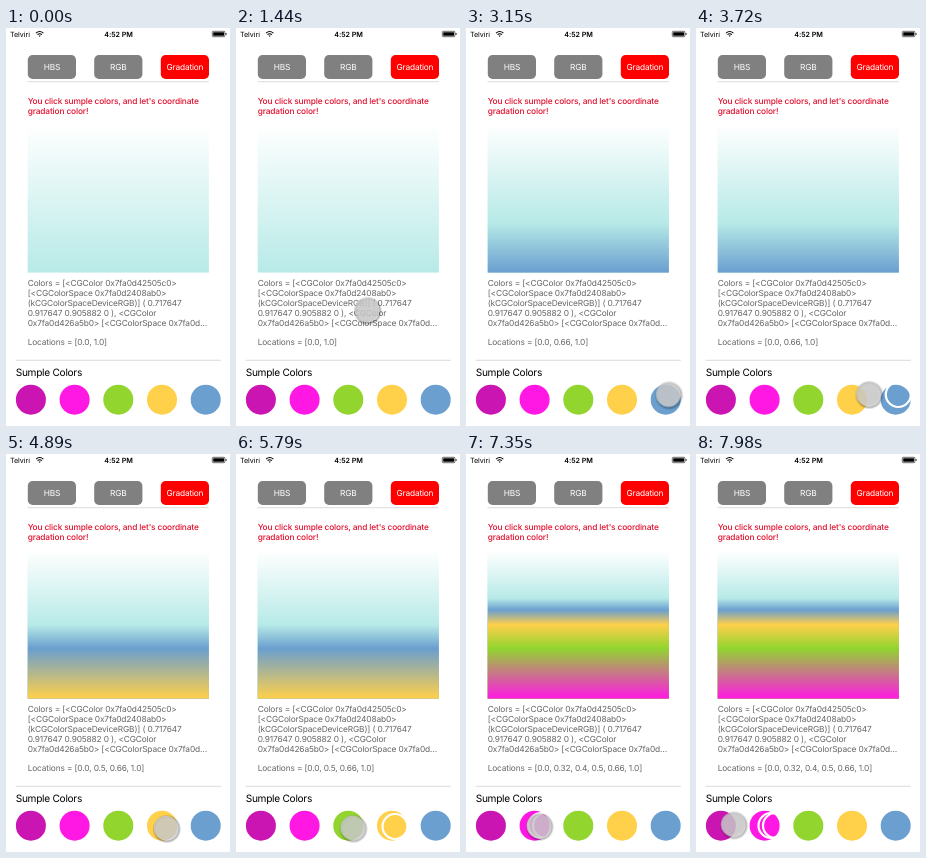
An HTML page for the animation above (8000 ms loop, 224x398 px).

```html
<!DOCTYPE html>
<html lang="en">
<head>
<meta charset="utf-8">
<title>Gradation</title>
<style>
  html, body { margin: 0; width: 100%; height: 100%; overflow: hidden; background: #fff; }
  svg { display: block; width: 100vw; height: 100vh; }
  text { font: 8.36px Inter, Roboto, sans-serif; letter-spacing: -.15px; white-space: pre; text-rendering: geometricPrecision; }
  .status { font-size: 7.17px; letter-spacing: -.06px; }
  .clock { font-weight: 600; text-anchor: middle; }
  .button { fill: #fff; text-anchor: middle; letter-spacing: -.2px; }
  .hint { fill: #e2102f; font-weight: 500; }
  .info { fill: #666; }
  .heading { font-size: 10.15px; letter-spacing: -.28px; }
  .rule { stroke: #ccc; stroke-width: .7; }

  /* Each tapped colour adds a stage that covers the one before. */
  .stage, .ring, #cursor { animation: 8s linear infinite; }
  .stage { opacity: 0; animation-timing-function: step-end; }
  .s1 { animation-name: tap1; }
  .s2 { animation-name: tap2; }
  .s3 { animation-name: tap3; }
  .s4 { animation-name: tap4; }
  @keyframes tap1 { 0% { opacity: 0 } 37.125%, 100% { opacity: 1 } }
  @keyframes tap2 { 0% { opacity: 0 } 61.125%, 100% { opacity: 1 } }
  @keyframes tap3 { 0% { opacity: 0 } 76.875%, 100% { opacity: 1 } }
  @keyframes tap4 { 0% { opacity: 0 } 88.875%, 100% { opacity: 1 } }

  /* White rings linger where the pointer rested. */
  .ring { fill: none; stroke: #fff; stroke-width: 2.2; opacity: 0; }
  .r0 { animation-name: rest0; stroke-width: 3; }
  .r1 { animation-name: rest1; }
  .r2 { animation-name: rest2; }
  .r3 { animation-name: rest3; }
  .r4 { animation-name: rest4; }
  @keyframes rest0 { 0%, 23.25% { opacity: 0 } 23.3%, 31.5% { opacity: 1 } 34.5%, 100% { opacity: 0 } }
  @keyframes rest1 { 0%, 40.5% { opacity: 0 } 40.6%, 47.25% { opacity: 1 } 51.375% { opacity: .3 } 58.125%, 100% { opacity: 0 } }
  @keyframes rest2 { 0%, 64.3% { opacity: 0 } 64.4%, 72.4% { opacity: 1 } 74.625%, 100% { opacity: 0 } }
  @keyframes rest3 { 0%, 79% { opacity: 0 } 79.1%, 81% { opacity: 1 } 83.75%, 100% { opacity: 0 } }
  @keyframes rest4 { 0%, 91.2% { opacity: 0 } 91.3%, 100% { opacity: 1 } }

  #cursor { animation-name: roam; }
  @keyframes roam {
    0% { opacity: 0; transform: translate(240px, 332px); animation-timing-function: step-end }
    9.375% { opacity: 1; transform: translate(217px, 326px); animation-timing-function: ease-out }
    10.5%, 12.75% { transform: translate(168px, 309px); animation-timing-function: ease-in-out }
    18% { transform: translate(131px, 282px) }
    18.75%, 21.75% { transform: translate(132px, 277.5px); animation-timing-function: ease-in-out }
    23.25% { transform: translate(127px, 271.5px); animation-timing-function: ease-in-out }
    31.125%, 40.125% { transform: translate(202.3px, 366.5px); animation-timing-function: ease-in-out }
    46.125%, 47.25% { transform: translate(172.5px, 366px) }
    51.375%, 55.875% { transform: translate(172.5px, 372.5px); animation-timing-function: ease-in-out }
    58.125%, 63.75% { transform: translate(160px, 374px); animation-timing-function: ease-in-out }
    71.25%, 78.375% { transform: translate(116.6px, 373.8px); animation-timing-function: ease-in-out }
    84.375% { transform: translate(79.5px, 372.5px) }
    86.625%, 90.75% { transform: translate(75px, 372px); animation-timing-function: ease-in-out }
    97.5%, 100% { opacity: 1; transform: translate(37.2px, 370.5px) }
  }
</style>
</head>
<body>
<svg viewBox="0 0 224 398" preserveAspectRatio="none">
  <defs>
    <radialGradient id="shade">
      <stop offset=".72" stop-color="#000" stop-opacity="0"/>
      <stop offset=".84" stop-color="#000" stop-opacity=".32"/>
      <stop offset="1" stop-color="#000" stop-opacity="0"/>
    </radialGradient>
  </defs>
  <rect width="224" height="398" fill="#fff"/>

  <text class="status" x="4" y="8.7">Telviri</text>
  <g fill="none" stroke="#000" stroke-width="1.1">
    <path d="M30 5.1Q33.7 1.9 37.4 5.1M31.5 6.7Q33.7 4.8 35.9 6.7"/>
    <path d="M32.7 7.6H34.7L33.7 8.9Z" fill="#000" stroke="none"/>
  </g>
  <text class="status clock" x="112.5" y="8.7">4:52 PM</text>
  <rect x="206.3" y="3.3" width="12.6" height="5.4" rx="1" fill="none" stroke="#000" stroke-width=".6"/>
  <rect x="207.2" y="4.2" width="10.8" height="3.6" rx=".4"/>
  <rect x="219.6" y="5" width=".9" height="2" rx=".4"/>

  <g fill="#808080">
    <rect x="21.8" y="27" width="48.2" height="24" rx="4.8"/>
    <rect x="88.2" y="27" width="48.2" height="24" rx="4.8"/>
    <rect x="154.8" y="27" width="48.2" height="24" rx="4.8" fill="#f00"/>
  </g>
  <text class="button" x="45.9" y="42">HBS</text>
  <text class="button" x="112.3" y="42">RGB</text>
  <text class="button" x="178.9" y="42">Gradation</text>
  <path class="rule" d="M21.5 53.7H202.8M9.6 332.3H214.8"/>

  <text class="hint" x="21.7" y="75.5">You click sumple colors, and let's coordinate</text>
  <text class="hint" x="21.7" y="85.5">gradation color!</text>

  <g class="info">
    <text x="21.7" y="257.6">Colors = [&lt;CGColor 0x7fa0d42505c0&gt;</text>
    <text x="21.7" y="267.6">[&lt;CGColorSpace 0x7fa0d2408ab0&gt;</text>
    <text x="21.7" y="277.6">(kCGColorSpaceDeviceRGB)] ( 0.717647</text>
    <text x="21.7" y="287.5">0.917647 0.905882 0 ), &lt;CGColor</text>
    <text x="21.7" y="297.5">0x7fa0d426a5b0&gt; [&lt;CGColorSpace 0x7fa0d…</text>
  </g>
  <g id="stages"></g>

  <text class="heading" x="9.7" y="348">Sumple Colors</text>
  <g id="swatches"></g>

  <circle class="ring r0" cx="133" cy="277" r="12.7"/>
  <circle class="ring r1" cx="202.3" cy="366.5" r="12.5"/>
  <circle class="ring r2" cx="159" cy="372.5" r="12.5"/>
  <circle class="ring r3" cx="116.6" cy="373.8" r="12.5"/>
  <circle class="ring r4" cx="79.5" cy="371.5" r="12.5"/>
  <circle class="ring r4" cx="75" cy="371.5" r="12.5"/>

  <g id="cursor">
    <circle cx=".8" cy="1" r="14.4" fill="url(#shade)"/>
    <circle r="12" fill="#c6c6c6" fill-opacity=".86" stroke="#d8d8d8" stroke-opacity=".6" stroke-width=".8"/>
  </g>
</svg>
<script>
  const NS = 'http://www.w3.org/2000/svg';
  const add = (parent, tag, attrs, text = '') => {
    const node = document.createElementNS(NS, tag);
    for (const key in attrs) node.setAttribute(key, attrs[key]);
    node.textContent = text;
    return parent.appendChild(node);
  };
  const byId = id => document.getElementById(id);

  const swatches = ['#cb15b2', '#ff18e3', '#92d52f', '#ffd04a', '#6a9fcf'];
  swatches.forEach((fill, i) =>
    add(byId('swatches'), 'circle', { cx: 24.9 + i * 43.7, cy: 371.7, r: 15, fill }));

  const [, pink, green, yellow, blue] = swatches;
  const colors = ['#fff', '#b7eae7', blue, yellow, green, pink];
  const inner = ['0.32', '0.4', '0.5', '0.66'];

  for (let i = 0; i < 5; i++) {
    const stops = ['0.0', ...inner.slice(4 - i), '1.0'];
    const group = add(byId('stages'), 'g', { class: i ? `stage s${i}` : '' });
    const gradient = add(group, 'linearGradient', { id: `fade${i}`, x2: 0, y2: 1 });
    stops.forEach((offset, k) => add(gradient, 'stop', { offset, 'stop-color': colors[k] }));
    add(group, 'rect', { x: 21.7, y: 97, width: 181.2, height: 147.6, fill: `url(#fade${i})` });
    add(group, 'rect', { x: 20, y: 308, width: 184, height: 14, fill: '#fff' });
    add(group, 'text', { class: 'info', x: 21.7, y: 317.4 }, `Locations = [${stops.join(', ')}]`);
  }
</script>
</body>
</html>
```
